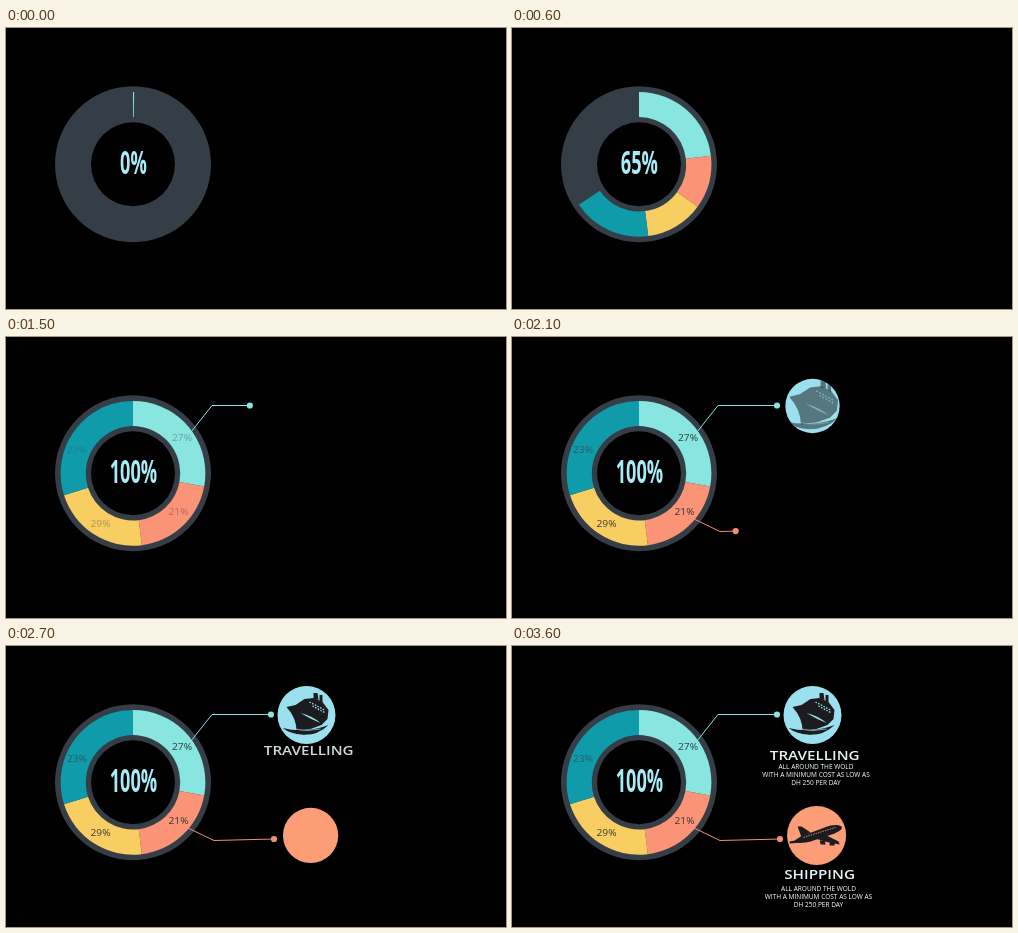
Recreate the animation shown at these times as an HTML page with a canvas. Size 500 by 281 pixels, loop 4000 ms.

```html
<!DOCTYPE html>
<html lang="en">
<head>
<meta charset="utf-8">
<title>Travel chart</title>
<style>
html, body { margin: 0; width: 100%; height: 100%; overflow: hidden; background: #000; }
canvas { display: block; width: 500px; height: 281px; }
</style>
</head>
<body>
<canvas id="stage" width="500" height="281"></canvas>
<script>
const ctx = document.getElementById('stage').getContext('2d');
const FONT = '"Open Sans", "Noto Sans", sans-serif';
const LOOP = 4000, STEP = 100, LAST = 3600;
const CX = 127, CY = 136.3;
const MINT = '#88e5df', CORAL = '#fb9376', GOLD = '#f8cd62', TEAL = '#109bab';
const SKY = '#9be0ee', PEACH = '#fc9d77', INK = '#1c1c20';

// Progress from 0 to 1: a higher `soft` delays the start, a higher `settle` slows the end.
function ease(t, from, to, soft = 1, settle = 1) {
  const p = Math.max(0, Math.min(1, (t - from) / (to - from)));
  return 1 - (1 - p ** soft) ** settle;
}

function disc(x, y, r, color) {
  ctx.fillStyle = color;
  ctx.beginPath();
  ctx.arc(x, y, r, 0, Math.PI * 2);
  ctx.fill();
}

function label(text, x, y, size, weight, color, stretch, alpha = 1) {
  ctx.save();
  ctx.globalAlpha = alpha;
  ctx.translate(x, y + size * 0.357);
  ctx.scale(stretch, 1);
  ctx.font = `${weight} ${size}px ${FONT}`;
  ctx.textAlign = 'center';
  ctx.fillStyle = color;
  ctx.fillText(text, 0, 0);
  ctx.restore();
}

function slice(from, to, color) {
  const a = (from - 90) * Math.PI / 180, b = (to - 90) * Math.PI / 180;
  ctx.fillStyle = color;
  ctx.beginPath();
  ctx.arc(CX, CY, 72.4, a, b);
  ctx.arc(CX, CY, 47.2, b, a, true);
  ctx.fill();
}

const slices = [
  { span: 100.5, color: MINT, text: '27%', x: 176, y: 101, ink: '#2b3a44' },
  { span: 72.5, color: CORAL, text: '21%', x: 172.5, y: 175, ink: '#3a3238' },
  { span: 79.3, color: GOLD, text: '29%', x: 94.5, y: 187, ink: '#3a3a36' },
  { span: 107.7, color: TEAL, text: '23%', x: 71, y: 113.3, ink: '#2f5866' },
];

function donut(t) {
  disc(CX, CY, 78, '#353d47');
  disc(CX, CY, 42, '#000');
  const first = Math.max(0.009, ease(t, 0, 900, 2, 3));
  const rest = ease(t, 330, 1070, 1.35, 3);
  const shown = ease(t, 1250, 1900);
  let angle = 0;
  slices.forEach((s, i) => {
    const end = angle + s.span * (i ? rest : first);
    if (end > angle) slice(angle, end, s.color);
    label(s.text, s.x, s.y, 8.7, 400, s.ink, 1.17, shown);
    angle = end;
  });
  const count = Math.round(100 * ease(t, 0, 1000, 1.4, 1.58));
  label(count + '%', CX + 0.4, 134.3, 33, 700, '#a9ecf8', 0.55);
}

// A bent line that grows to the given length, with a dot at its tip.
function leader(points, length, color) {
  if (length <= 0) return;
  let [x, y] = points[0];
  ctx.strokeStyle = color;
  ctx.lineWidth = 1;
  ctx.beginPath();
  ctx.moveTo(x, y);
  for (const [nx, ny] of points.slice(1)) {
    const d = Math.hypot(nx - x, ny - y);
    const k = Math.min(1, length / d);
    x += (nx - x) * k;
    y += (ny - y) * k;
    ctx.lineTo(x, y);
    length -= d;
    if (length <= 0) break;
  }
  ctx.stroke();
  disc(x, y, 3.1, color);
}

function shape(path, color) {
  ctx.fillStyle = color;
  ctx.fill(new Path2D(path));
}

function stroke(path, color, width, dash = []) {
  ctx.strokeStyle = color;
  ctx.lineWidth = width;
  ctx.setLineDash(dash);
  ctx.stroke(new Path2D(path));
  ctx.setLineDash([]);
}

// Icons are drawn around the centre of their badge.
function ship() {
  shape('M-20-8L-11-10L-2-16L7-17L16-13L22-5L21 4L15 10L4 14L-10 16Q-10 3-20-8Z', INK);
  shape('M7-16L7-22L11-22L12-15ZM13-14L13-20L16-20L16-12Z', INK);
  stroke('M3-13L18-5M6-9L19-2', SKY, 1.3, [1.5, 1.5]);
  shape('M-6-2Q6 1 14 8Q4 4-6-2Z', SKY);
  shape('M-24 13Q-12 16 0 15Q12 14 22 10Q12 20-3 20Q-16 19-24 13Z', INK);
  stroke('M-12 14Q0 17 14 14M-16 18Q-4 22 12 19', SKY, 0.7);
}

function plane() {
  shape('M-22 5L-16 1L8-8Q19-12 25-9Q27-6 18-2L-6 6Q-18 9-22 5Z', INK);
  shape('M-15 2L-19-9L-15-9L-6-3Z', INK);
  shape('M-16 4L-27 6L-27 8L-14 7Z', INK);
  shape('M-4 2L6-2L22 6L23 9L8 6Z', INK);
  shape('M3 5L8 5L9 9L4 9ZM13 6L18 7L18 10L13 10Z', INK);
  stroke('M-13 2L19-8', PEACH, 0.8, [1.5, 1]);
}

function badge(x, y, r, color, icon, alpha, zoom) {
  if (r <= 0) return;
  disc(x, y, r, color);
  ctx.save();
  ctx.beginPath();
  ctx.arc(x, y, r, 0, Math.PI * 2);
  ctx.clip();
  ctx.globalAlpha = alpha;
  ctx.translate(x, y);
  ctx.scale(zoom, zoom);
  icon();
  ctx.restore();
}

const offers = [
  {
    title: 'TRAVELLING', titleX: 302.7, titleY: 109, titleAt: 2300,
    line: [[185, 95], [206, 68.5], [265, 68.5]], lineColor: MINT, lineAt: 657, speed: 0.085,
    x: 300.5, y: 69, r: 29, color: SKY, badgeAt: 1800,
    icon: ship, iconAt: 1900, iconFor: 500,
    noteX: 304, noteY: 119.9, noteAt: 2900, drop: 5, noteFade: 500,
  },
  {
    title: 'SHIPPING', titleX: 307.6, titleY: 228, titleAt: 2850,
    line: [[182, 182], [208, 194.5], [268, 193]], lineColor: '#f28f75', lineAt: 1550, speed: 0.081,
    x: 304.6, y: 189.4, r: 29.5, color: PEACH, badgeAt: 2400,
    icon: plane, iconAt: 2800, iconFor: 700,
    noteX: 306.5, noteY: 242, noteAt: 2800, drop: 24, noteFade: 300,
  },
];
const noteLines = ['ALL AROUND THE WOLD', 'WITH A MINIMUM COST AS LOW AS', 'DH 250 PER DAY'];

function offer(t, o) {
  leader(o.line, (t - o.lineAt) * o.speed, o.lineColor);

  const size = ease(t, o.badgeAt, o.badgeAt + 500, 1, 3);
  const seen = ease(t, o.iconAt, o.iconAt + o.iconFor, 1, 1.5);
  badge(o.x, o.y, o.r * size, o.color, o.icon, seen, 1 + 0.35 * (1 - seen));

  const noteY = o.noteY - o.drop * (1 - ease(t, o.noteAt, o.noteAt + 500, 1, 1.8));
  const noteAlpha = ease(t, o.noteAt, o.noteAt + o.noteFade);
  noteLines.forEach((text, i) => {
    label(text, o.noteX, noteY + i * 8.1, 7.5, 500, '#fff', 0.87, noteAlpha);
  });

  const titleY = o.titleY - 20 * (1 - ease(t, o.titleAt, o.titleAt + 700, 1.3, 2.1));
  label(o.title, o.titleX, titleY, 13, 600, '#e9f3f5', 1.17, ease(t, o.titleAt, o.titleAt + 450));
}

function draw(t) {
  ctx.fillStyle = '#000';
  ctx.fillRect(0, 0, 500, 281);
  donut(t);
  offers.forEach(o => offer(t, o));
}

const begin = performance.now();
function tick() {
  const t = (performance.now() - begin) % LOOP;
  draw(Math.min(LAST, Math.floor(t / STEP) * STEP));
  requestAnimationFrame(tick);
}
tick();
</script>
</body>
</html>
```
